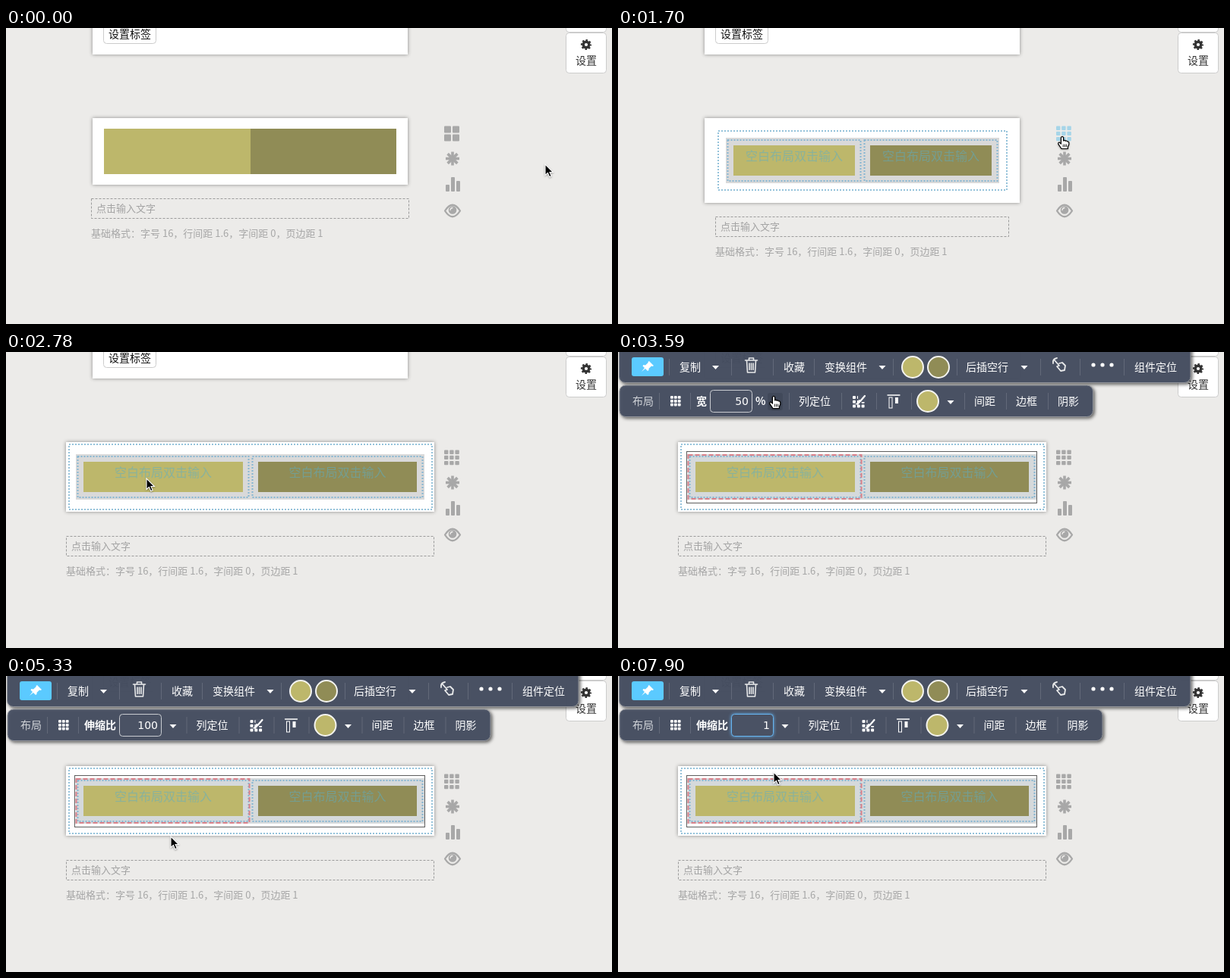
An HTML page for the animation above (7990 ms loop, 798 by 391 pixels).

```html
<!DOCTYPE html>
<html lang="zh-CN">
<head>
<meta charset="utf-8">
<title>布局宽度设置</title>
<style>
html, body { margin: 0; width: 100%; height: 100%; overflow: hidden; background: #ecebe9; }
svg { display: block; width: 798px; height: 391px; font-family: "Noto Sans CJK SC", "Noto Sans CJK", "Noto Sans CJK JP", sans-serif; }
.card { filter: drop-shadow(0 0 2.5px rgba(0,0,0,.42)); }
.panel { fill: #485063; fill-opacity: .965; stroke: #92959b; stroke-width: 1; filter: drop-shadow(2px 2px 2px rgba(0,0,0,.6)); }
.line { fill: none; stroke-linecap: round; stroke-linejoin: round; }
.glow { filter: drop-shadow(0 0 3px #5bcaff); font-weight: bold; }
.pointer { filter: drop-shadow(0 1px 1px rgba(0,0,0,.35)); }
</style>
</head>
<body>
<svg id="stage" viewBox="0 0 798 391">
  <g id="page"></g>
  <g id="card"></g>
  <g id="side"></g>
  <g id="tools"></g>
  <g id="menu"></g>
  <g id="pointer"></g>
</svg>
<script>
const LOOP = 7990;
const KHAKI = '#bdb76b', OLIVE = '#908c56', BLUE = '#5bcaff', GREY = '#a8a8a8';

const rect = (x, y, w, h, fill, more = '') =>
  `<rect x="${x}" y="${y}" width="${w}" height="${h}" fill="${fill}" ${more}/>`;
const frame = (x1, y1, x2, y2, color, width, dash = 'none') =>
  rect(x1, y1, x2 - x1, y2 - y1, 'none', `stroke="${color}" stroke-width="${width}" stroke-dasharray="${dash}"`);
const circle = (x, y, r, fill, more = '') => `<circle cx="${x}" cy="${y}" r="${r}" fill="${fill}" ${more}/>`;
const path = (d, color, width = 1.5) => `<path class="line" d="${d}" stroke="${color}" stroke-width="${width}"/>`;
const solid = (d, fill, more = '') => `<path d="${d}" fill="${fill}" ${more}/>`;
const at = (x, y, body) => `<g transform="translate(${x} ${y})">${body}</g>`;
// y is the vertical middle of the line
const text = (x, y, str, size = 14, fill = '#fff', more = '') =>
  `<text x="${x}" y="${y + size * .37}" font-size="${size}" fill="${fill}" ${more}>${str}</text>`;
const bold = 'font-weight="bold"', middle = 'text-anchor="middle"';

const grid = (x, y, n, size, gap, color) => {
  let out = '';
  for (let i = 0; i < n * n; i++)
    out += rect(x + i % n * (size + gap), y + (i / n | 0) * (size + gap), size, size, color, 'rx="1"');
  return out;
};
const caret = (x, y) => solid(`M${x - 4.5} ${y - 2}h9l-4.5 5z`, '#fff');
const bars = (xs, y, h) => xs.map(x => rect(x, y, 1, h, '#626979')).join('');
const swatch = (x, y, color) => circle(x, y, 14, color, 'stroke="#f4f4f0" stroke-width="2"');

function drawPage() {
  return `<g class="card">${rect(114, -10, 415, 45, '#fff')}</g>` +
    rect(128.5, -9.5, 69, 30, '#fff', 'rx="4" stroke="#ccc"') +
    text(135, 8, '设置标签', 14, '#111') +
    rect(737.5, -20.5, 53, 26, '#fff', 'rx="4" stroke="#ccc"') +
    rect(737.5, 6.5, 53, 53, '#fff', 'rx="4" stroke="#ccc"') +
    circle(764, 22, 3.8, 'none', 'stroke="#333" stroke-width="3.4"') +
    circle(764, 22, 5.8, 'none', 'stroke="#333" stroke-width="2.6" stroke-dasharray="2.4 2.155" stroke-dashoffset="1.2"') +
    text(750, 43, '设置', 14, '#333');
}

const hint = (x1, x2, y) =>
  frame(x1 + .5, y + .5, x2 - .5, y + 26.5, '#9b9b9b', 1, '3 2') +
  text(x1 + 7, y + 13, '点击输入文字', 13, '#a3a3a3') +
  text(x1, y + 46, '基础格式：字号 16，行间距 1.6，字间距 0，页边距 1', 13, '#a6a6a6');

const plainCard = () =>
  `<g class="card">${rect(114, 119, 415, 88, '#fff')}</g>` +
  rect(129, 133, 193, 60, KHAKI) + rect(322, 133, 192, 60, OLIVE) + hint(112, 531, 225);

// k: 0 = narrow edit view, 1 = wide edit view
function editCard(k, selected) {
  const mix = (a, b) => a + (b - a) * k;
  const left = mix(114, 79), right = mix(529, 564), bottom = mix(231, 211);
  const pad = mix(18, 4), top = mix(145, 135);
  const inL = mix(142, 92), inR = mix(502, 551);
  const cell = (x1, x2, color, picked) => {
    const cx = (x1 + x2) / 2;
    return frame(x1, top + 3, x2, top + 57, '#86b6d2', 2, '2 2') +
      (picked ? frame(x1 - 2, top + 1, x2 + 1, top + 59, '#d98089', 2, '6 3') : '') +
      rect(x1 + 7.5, top + 10, x2 - x1 - 15, 40, color) +
      text(cx, top + 24, '空白布局双击输入', 16, '#5aaec8', `${middle} fill-opacity=".52"`);
  };
  return `<g class="card">${rect(left, 119, right - left, bottom - 119, '#fff')}</g>` +
    frame(left + pad, 118 + pad, right - pad + 1, bottom - pad + 1, '#94c2da', 2, '2 2') +
    rect(inL, top, inR - inL, 60, selected ? '#d5d9db' : '#d9d9d9') +
    cell(inL + 2.5, 319.5, KHAKI, selected) + cell(324.5, inR - 2.5, OLIVE) +
    (selected ? frame(90.5, 131.5, 551.5, 199.5, '#5d5d5d', 1) : '') +
    hint(mix(128, 79), mix(515, 564), mix(249, 243));
}

function drawSide(nine, hover) {
  const color = hover ? '#a6d5e8' : GREY;
  let out = nine ? grid(577, 129.5, 3, 5.4, 1.8, color) : grid(577, 129.5, 2, 9, 2, color);
  for (let a = 0; a < 180; a += 45)
    out += `<path d="M588 163.5V181.5" stroke="${GREY}" stroke-width="3.6" transform="rotate(${a} 588 172.5)"/>`;
  return out + rect(579, 207, 5, 9, GREY, 'rx="1"') + rect(586, 197, 5, 19, GREY, 'rx="1"') +
    rect(593, 202, 5, 14, GREY, 'rx="1"') +
    path('M578 241.5Q588 226 598 241.5Q588 257 578 241.5Z', GREY, 2.3) +
    circle(588, 240.5, 5.3, GREY) + path('M585 240.5Q585.2 237.8 588 237.5', '#ecebe9', 1.3);
}

const pin = solid('M2 -7L8 -1L6.5 0L5 -.5L1.5 3L1.5 5L0 6L-3 3L-8 7L-4 2L-6.5 -.5L-5.5 -2L-3 -1.5L.8 -5L.5 -6Z', '#fff');
const trash = path('M-8 -7H8M-3 -7V-10H3V-7M-6 -7L-5 9H5L6 -7M-2.5 -3V5.5M0 -3V5.5M2.5 -3V5.5', '#e8e9ea', 1.6);
const finger = path('M-6 -6L0 1M-8 -2Q-9 -8 -3 -9M0 1L-3 2L2 8L7 7L8 1L4 -3L0 -2', '#e8e9ea', 1.8);
const brush = grid(-8, -7, 3, 4, 1.8, '#fff') + rect(-1, -8, 10, 9, '#4e5668') +
  path('M8 -7L2 0', '#fff', 2.2) + solid('M3 -1L-1 5L-5 4Q-2 3 0 -2Z', '#fff');
const alignTop = path('M-8 -8H8', '#fff', 1.3) + rect(-6, -5, 4, 14, 'none', 'stroke="#fff"') + rect(2, -5, 4, 8, '#fff');

function topBar() {
  return rect(1.5, -12, 752.5, 52.5, '#485063', 'class="panel" rx="8"') +
    bars([67, 149, 204, 258, 362, 446, 556, 608, 666], 9, 22) +
    rect(18, 7, 42, 25, BLUE, 'rx="3"') + at(39, 19, pin) +
    text(81, 20, '复制') + caret(128.5, 20) + at(175.5, 18, trash) +
    text(218, 20, '收藏') + text(272, 20, '变换组件') + caret(348, 20) +
    swatch(388, 20, KHAKI) + swatch(422, 20, OLIVE) +
    text(458, 20, '后插空行') + caret(535, 20) + at(581, 17, finger) +
    [626, 638, 650].map(x => circle(x, 17, 2.6, '#fff')).join('') +
    text(680, 20, '组件定位');
}

function field(x, value, { focus, picked, blink }) {
  const end = x + 50.5;
  return rect(x, 50.5, 55, 29, '#4a5264',
      `rx="4" stroke="${focus ? '#66b5f0' : '#c9ccd1'}" ${focus ? 'style="filter:drop-shadow(0 0 2px #66afe9)"' : ''}`) +
    (picked ? rect(end - 27, 56, 27, 17, '#6f95c0') : '') +
    text(end, 65, value, 14, '#fff', 'text-anchor="end" font-family="DejaVu Sans, sans-serif"') +
    (blink ? rect(197, 56, 1, 17, '#fff') : '');
}

function subBar(s) {
  const shift = s.flex ? 12.5 : 0;
  const button = s.open ? '#3f8738' : s.overCaret ? '#41495a' : '';
  const left = s.flex
    ? text(103, 65, '伸缩比', 14, '#fff', bold) + field(149.5, s.value, s) + caret(220, 66)
    : text(103, 65, '宽', 14, '#fff', bold) + field(121.5, '50', {}) + text(181, 65, '%', 14, '#fff', bold) +
      (button ? rect(197, 54, 20, 23, button, 'rx="3"') : '') + caret(207, 66);
  return rect(2, 44, 623.5 + shift, 41.5, '#485063', 'class="panel" rx="8"') +
    text(19, 65, '布局', 14, '#d0d3d8') + grid(69, 58, 3, 3.8, 1.1, '#fff') + bars([54, 95], 54, 22) + left +
    at(shift, 0, bars([225, 294, 340, 386, 456, 511, 566], 54, 22) +
      text(238, 65, '列定位') + at(317, 65, brush) + at(363, 65, alignTop) +
      swatch(408, 65, KHAKI) + caret(438, 66) +
      text(469, 65, '间距') + text(524, 65, '边框') + text(579, 65, '阴影'));
}

function drawMenu(hover) {
  const items = ['宽度百分比', '宽度固定像素', '宽度自适应', '宽度自伸缩'];
  return rect(127.5, 96.5, 159, 143, '#485063', 'class="panel" rx="6"') + rect(128, 101, 158, 33, BLUE) +
    items.map((name, i) =>
      (i ? rect(128, 101 + 33 * i, 158, 1, '#343a47') : '') +
      text(207, 118 + 33 * i, name, 14, '#fff', middle + (i === hover ? ' class="glow"' : ''))).join('');
}

const pointers = {
  arrow: solid('M0 0V14.5L3.4 11.4L5.7 16.7L8.2 15.6L6 10.5H10.4Z', '#000', 'stroke="#fff" stroke-width="1.1"'),
  hand: solid('M-1.6 1.6Q0 -1 1.6 1.6V6Q3.2 4.6 4.2 6.3Q5.8 5.3 6.6 7Q8.6 6.5 8.8 8.6V11L7.4 14V16.5H-1L-5 10.6Q-5.8 8 -3.6 8.2L-1.6 10.2Z',
    '#fff', 'stroke="#000" stroke-width="1.2" stroke-linejoin="round"') + path('M1.3 11V14M3.5 11V14M5.6 11V14', '#000', .9),
  beam: ['#fff', '#111'].map((c, i) =>
    path('M-3 -8.5Q0 -8.5 0 -6Q0 -8.5 3 -8.5M0 -6V6M-3 8.5Q0 8.5 0 6Q0 8.5 3 8.5M-2 3H2', c, i ? 1.1 : 3)).join('')
};

// start, end, number of steps, points along the way
const moves = [
  [990, 1430, 6, [710, 180], [690, 173], [650, 152], [609, 132], [580, 126], [584, 139], [585, 143]],
  [1790, 2240, 6, [585, 143], [530, 152], [410, 166], [300, 176], [235, 177], [215, 175]],
  [2510, 2780, 4, [215, 175], [185, 167]],
  [3140, 3590, 6, [185, 167], [190, 130], [201, 76], [205, 58]],
  [3770, 4540, 10, [205, 58], [205, 58], [207, 90], [212, 150], [216, 188]],
  [4630, 4970, 5, [216, 188], [217, 194], [217, 200], [217, 206], [217, 210], [217, 212]],
  [5240, 5930, 9, [217, 212], [217, 212], [208, 160], [194, 100], [188, 80]],
  [6110, 6290, 3, [188, 80], [187, 77]],
  [7810, 7900, 2, [187, 77], [205, 127]]
];

function position(t) {
  let now = moves[0][3];
  for (const [start, end, steps, ...pts] of moves) {
    if (t < start) break;
    const step = Math.min(steps, 1 + Math.floor((t - start) / ((end - start) / (steps - 1)) + 1e-6));
    const f = step / steps * (pts.length - 1), i = Math.min(pts.length - 2, Math.floor(f)), k = f - i;
    now = [0, 1].map(j => pts[i][j] + (pts[i + 1][j] - pts[i][j]) * k);
  }
  return now;
}

const shown = {};
function put(id, html) {
  if (shown[id] !== html) document.getElementById(id).innerHTML = shown[id] = html;
}

function render(t) {
  const [x, y] = position(t);
  const open = t >= 3770 && t < 5240, bar = t >= 2870, flex = t >= 5240;
  const onIcon = x > 574 && x < 598 && y < 150;
  const overCaret = bar && !flex && x > 196 && x < 217 && y > 53 && y < 78;
  const onField = flex && y > 50 && y < 83;
  const grow = t < 1790 ? 0 : t < 1880 ? .5 : 1;

  put('page', drawPage());
  put('card', t < 1700 ? plainCard() : editCard(grow, bar));
  put('side', drawSide(t >= 1700, onIcon));
  put('tools', bar ? topBar() + subBar({
    flex, open, overCaret,
    value: t < 7100 ? '100' : '1',
    focus: t >= 6740,
    picked: t >= 6920 && t < 7100,
    blink: t >= 7100 && t < 7630
  }) : '');
  put('menu', open ? drawMenu(y < 101 ? -1 : Math.floor((y - 101) / 33)) : '');

  const inMenu = open && y > 100;
  const shape = onField ? 'beam' : onIcon || overCaret || inMenu ? 'hand' : 'arrow';
  put('pointer', `<g class="pointer">${at(x, y, pointers[shape])}</g>`);
}

const began = performance.now();
function tick() {
  render((performance.now() - began) % LOOP);
  requestAnimationFrame(tick);
}
tick();
</script>
</body>
</html>
```
